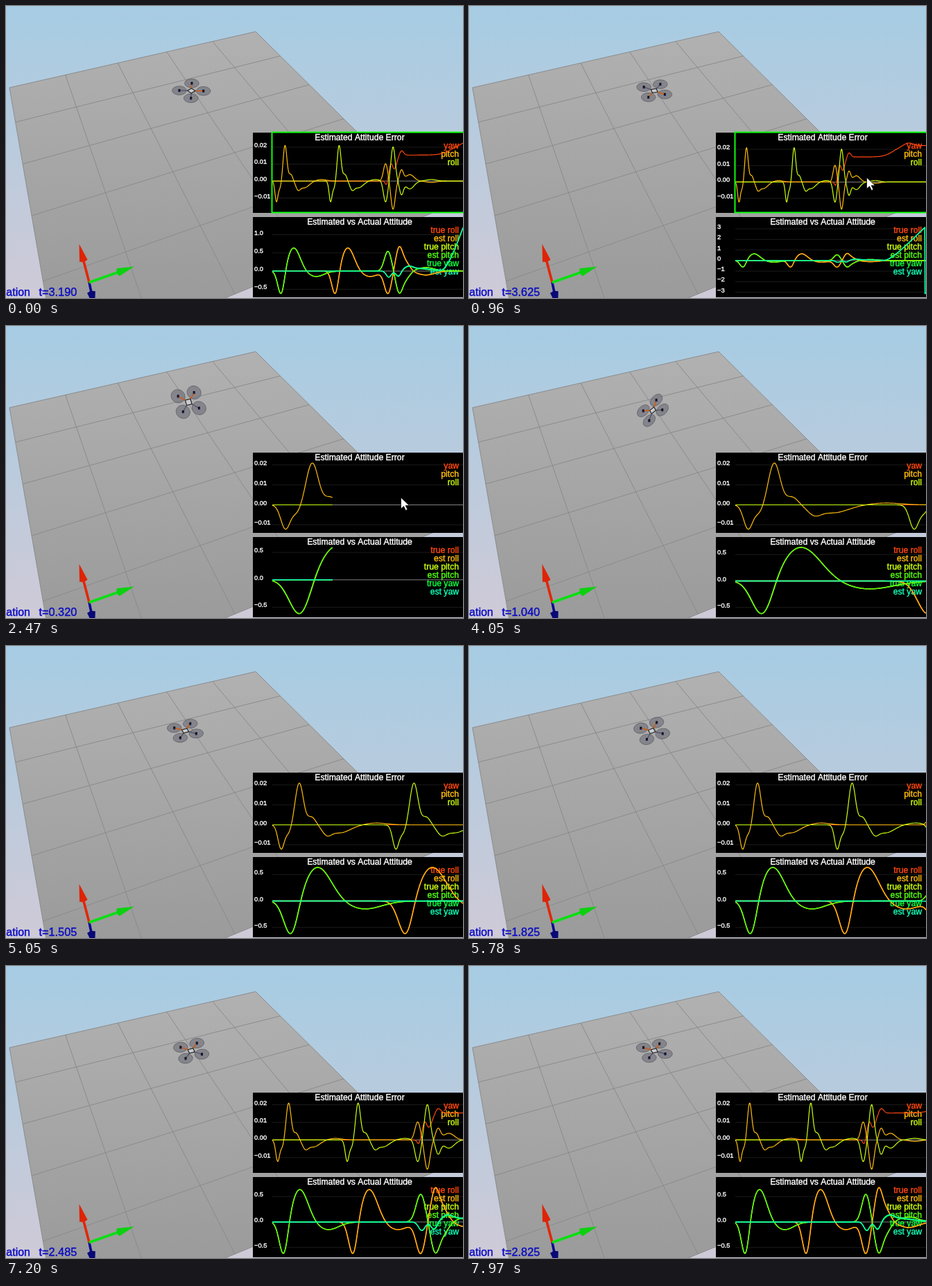
Recreate the animation shown at these times as an HTML page with a canvas. Size 659 px wide and 422 px high, loop 8000 ms.

```html
<!DOCTYPE html>
<html lang="en">
<head>
<meta charset="utf-8">
<title>Quadrotor attitude estimate</title>
<style>
html, body { margin: 0; width: 100%; height: 100%; overflow: hidden; }
canvas { display: block; width: 659px; height: 422px; }
</style>
</head>
<body>
<canvas id="stage"></canvas>
<script>
const W = 659, H = 422, LOOP = 8000, TICK = 46.6, RESET = 38, DT = 0.005;
const canvas = document.getElementById('stage');
const ctx = canvas.getContext('2d');
const ratio = window.devicePixelRatio || 1;
canvas.width = W * ratio;
canvas.height = H * ratio;

const bump = (t, center, width, height) => height * Math.exp(-(((t - center) / width) ** 2));
const rise = (t, center, width, height) => height * (1 + Math.tanh((t - center) / width)) / 2;
const smooth = (x, from, to) => {
  const s = Math.min(1, Math.max(0, (x - from) / (to - from)));
  return s * s * (3 - 2 * s);
};
const wrap = a => a > Math.PI ? a - 2 * Math.PI : a;

// Attitude: a kick on pitch, the same kick on roll, then an opposed swing of both and a yaw spin.
const ROLL_DELAY = 0.905;
const kick = t => bump(t, .15, .08, -.7) + bump(t, .36, .15, .64) + bump(t, .73, .19, -.15);
const swing = t => bump(t, 1.935, .085, .56) + bump(t, 2.12, .08, -.56)
  + bump(t, 2.23, .1, -.22) + bump(t, 2.57, .2, .1);
const spin = t => 5 * (Math.hypot(Math.max(0, t - 2.803), .2) - .2);
const pitch = t => kick(t) + .97 * swing(t);
const roll = t => kick(t - ROLL_DELAY) - 1.08 * swing(t);
const yaw = t => bump(t, 1.95, .06, -.17) + bump(t, 2.11, .06, -.16)
  + bump(t, 2.28, .1, .09) + bump(t, 2.45, .25, .06) + spin(t);

// Estimation errors caused by the same three events.
const kickError = t => bump(t, .07, .035, -.012) + bump(t, .13, .035, -.004) + bump(t, .213, .045, .021)
  + bump(t, .31, .045, .004) + bump(t, .43, .05, -.0035) + bump(t, .53, .12, -.004) + bump(t, .82, .12, .0009);
const swingError = t => bump(t, 1.895, .05, .0108) + bump(t, 2.02, .05, -.0175)
  + bump(t, 2.16, .045, .0065) + bump(t, 2.3, .1, .004) + bump(t, 2.66, .12, -.0008);
const pitchError = t => kickError(t) + .95 * swingError(t);
const rollError = t => kickError(t - ROLL_DELAY) - 1.15 * swingError(t);
const yawError = t => bump(t, 1.91, .03, -.0025) + bump(t, 1.985, .045, .009) + rise(t, 2.06, .06, .0153)
  + bump(t, 2.16, .05, .003) + rise(t, 3, .18, .007) + bump(t, 3.29, .12, .0018);

const plots = [
  { top: 183, title: 'Estimated Attitude Error', minRange: .001, width: 1.2,
    series: { yaw: yawError, pitch: pitchError, roll: rollError } },
  { top: 305, title: 'Estimated vs Actual Attitude', minRange: .02, width: 1.4,
    series: {
      'true roll': roll, 'est roll': t => roll(t) + rollError(t),
      'true pitch': pitch, 'est pitch': t => pitch(t) + pitchError(t),
      'true yaw': t => wrap(yaw(t)), 'est yaw': t => wrap(yaw(t) + yawError(t))
    } }
];
for (const plot of plots)
  plot.series = Object.entries(plot.series).map(([name, f], i) => ({
    name,
    color: `hsl(${14 + 29.5 * i}, 100%, 53%)`,
    data: Array.from({ length: 4.05 / DT }, (_, k) => f(k * DT))
  }));

function text(str, x, y, size, color, align = 'left') {
  ctx.font = `${size}px "Liberation Sans", Arial, sans-serif`;
  ctx.textAlign = align;
  ctx.lineWidth = .4;
  ctx.fillStyle = ctx.strokeStyle = color;
  ctx.fillText(str, x, y);
  ctx.strokeText(str, x, y);
}

function line(points, color, width) {
  ctx.beginPath();
  points.forEach(p => ctx.lineTo(p[0], p[1]));
  ctx.strokeStyle = color;
  ctx.lineWidth = width;
  ctx.stroke();
}

function shape(points, fill) {
  ctx.beginPath();
  points.forEach(p => ctx.lineTo(p[0], p[1]));
  ctx.closePath();
  ctx.fillStyle = fill;
  ctx.fill();
}

function gradient(from, to) {
  const g = ctx.createLinearGradient(0, 0, 0, H);
  g.addColorStop(0, from);
  g.addColorStop(1, to);
  return g;
}

// Perspective map of the unit square onto corners a, b, c, d.
function perspective(a, b, c, d) {
  const [ux, uy, vx, vy] = [b[0] - c[0], b[1] - c[1], d[0] - c[0], d[1] - c[1]];
  const sx = a[0] - b[0] + c[0] - d[0], sy = a[1] - b[1] + c[1] - d[1];
  const det = ux * vy - uy * vx;
  const g = (sx * vy - sy * vx) / det, h = (ux * sy - uy * sx) / det;
  return (u, v) => [0, 1].map(k =>
    (a[k] + (b[k] * (1 + g) - a[k]) * u + (d[k] * (1 + h) - a[k]) * v) / (1 + g * u + h * v));
}
const floorMap = perspective([5, 118], [360, 37], [487, 163], [37, 303]);
const floorAt = (col, row) => floorMap(col / 5, row / 3);

function arrow(x, y, tipX, tipY, color, head) {
  const length = Math.hypot(tipX - x, tipY - y);
  const dx = (tipX - x) / length, dy = (tipY - y) / length;
  const baseX = tipX - dx * 25, baseY = tipY - dy * 25;
  line([[x, y], [baseX + dx, baseY + dy]], color, 3.6);
  shape([[tipX, tipY], [baseX - dy * 6, baseY + dx * 6], [baseX - dx * 2, baseY - dy * 2],
    [baseX + dy * 6, baseY - dx * 6]], head);
}

function drawScene() {
  ctx.fillStyle = gradient('#a6cce3', '#cfcad7');
  ctx.fillRect(0, 0, W, H);
  shape([floorAt(0, 0), floorAt(5, 0), floorAt(5, 5), floorAt(0, 5)], gradient('#b3b3b3', '#9b9b9b'));
  for (let i = 0; i <= 5; i++) {
    line([floorAt(0, i), floorAt(5, i)], '#8b8b8b', 1);
    line([floorAt(i, 0), floorAt(i, 5)], '#8b8b8b', 1);
  }
  arrow(120, 399.5, 128, 438, '#0a0a90', '#080878');
  arrow(120, 399.5, 105.5, 344, '#e02808', '#dd2408');
  arrow(120, 399.5, 185, 376.5, '#08e010', '#0cd010');
}

function drawDrone(t) {
  const y = yaw(t), p = pitch(t), r = roll(t);
  const heading = -110.5 * Math.PI / 180 + y;
  const forward = [Math.cos(heading), -Math.sin(heading)];
  const side = [-Math.sin(heading), -Math.cos(heading)];
  // View from about 38 degrees above the floor.
  const project = (x, depth, up) => [x, -depth * .62 - up * .78];
  const f = project(forward[0] * Math.cos(p), forward[1] * Math.cos(p), Math.sin(p));
  const s = project(
    side[0] * Math.cos(r) + forward[0] * Math.sin(p) * Math.sin(r),
    side[1] * Math.cos(r) + forward[1] * Math.sin(p) * Math.sin(r),
    -Math.cos(p) * Math.sin(r));
  const cx = 267.3 + bump(t, .4, .25, -4.5) + bump(t, 1.45, .35, -9) + bump(t, 2.1, .2, -6);
  const cy = 122.5 + bump(t, .42, .35, -13.5) + bump(t, 2.1, .15, 6.5);
  const at = (a, b) => [cx + a * f[0] + b * s[0], cy + a * f[1] + b * s[1]];
  const disc = (a, b, radius) => Array.from({ length: 33 }, (_, i) =>
    at(a + radius * Math.cos(i * Math.PI / 16), b + radius * Math.sin(i * Math.PI / 16)));
  const arm = 12.3;
  const rotors = [[-arm, -arm], [-arm, arm], [arm, -arm], [arm, arm]];
  for (const [a, b] of rotors) {
    const ring = disc(a, b, 10.2);
    shape(ring, 'rgba(116,116,124,.7)');
    line(ring, '#5c5c66', .8);
  }
  for (const [a, b] of rotors) {
    line([at(a * .15, b * .15), at(a, b)], a > 0 ? '#c8601c' : '#50506c', a > 0 ? 1.8 : 1.2);
    const [x, z] = at(a, b);
    ctx.fillStyle = '#10101c';
    ctx.fillRect(x - 1.5, z - 2, 3, 4);
    ctx.fillStyle = '#28288c';
    ctx.fillRect(x - .5, z + .5, 1.5, 1.5);
  }
  const body = [at(4, -4), at(4, 4), at(-4, 4), at(-4, -4)];
  shape(body, '#c8ccd0');
  line([...body, body[0]], '#262628', 1.2);
}

function niceStep(range) {
  for (let base = 1e-5; ; base *= 10)
    for (const m of [1, 5]) if (range / (base * m) < 6.5) return base * m;
}

function drawPlot({ top, title, series, minRange, width }, t) {
  const count = Math.max(2, Math.round(t / DT) + 1);
  let min = -minRange / 2, max = minRange / 2;
  for (const { data } of series)
    for (const v of data.slice(0, count)) {
      min = Math.min(min, v);
      max = Math.max(max, v);
    }
  const high = top + 15, scale = 95.7 / (max - min);
  const toY = v => high + (max - v) * scale;
  const toX = s => 384 + s * 275 / Math.max(1.015, t);

  ctx.save();
  ctx.beginPath();
  ctx.rect(356, top, W - 356, 116);
  ctx.clip();
  ctx.fillStyle = '#000';
  ctx.fillRect(356, top, W - 356, 116);
  const step = niceStep(max - min);
  const digits = Math.max(0, Math.ceil(-Math.log10(step) - 1e-6));
  for (let k = Math.ceil(min / step); k <= max / step; k++) {
    const y = toY(k * step);
    line([[384, y], [W, y]], k ? '#1c1c1c' : '#808080', 1);
    text((k * step).toFixed(digits).replace('-', '\u2212'), 358, y, 9.3, '#fff');
  }
  text(title, 510, top + 11, 12.2, '#fff', 'center');
  series.forEach((s, i) => text(s.name, 653, top + 23 + 12 * i, 12.2, s.color, 'right'));
  ctx.lineJoin = 'round';
  for (const { data, color } of series)
    line(data.slice(0, count).map((v, i) => [toX(i * DT), toY(v)]), color, width);
  ctx.restore();
}

function drawPointer(ms) {
  const x = 573.5 - 4 * smooth(ms, 2000, 2300);
  const y = 248 + 176 * (1 - smooth(ms, 450, 880) + smooth(ms, 2600, 2950));
  const outline = [[0, 0], [0, 16], [4, 12.5], [7, 18.5], [9.5, 17.3], [6.7, 11.5], [12, 11.5], [0, 0]]
    .map(p => [x + p[0], y + p[1]]);
  shape(outline, '#fff');
  line(outline, '#111', .8);
}

function draw(ms) {
  const tick = Math.min(171, Math.floor(ms / TICK + .65));
  const clock = tick < RESET ? 3.19 + .0207 * tick : .0004 + .02122 * (tick - RESET);
  const t = Math.round(clock / DT) * DT;
  ctx.setTransform(ratio, 0, 0, ratio, 0, 0);
  drawScene();
  drawDrone(t);
  text('mation', 35, 419, 16, '#0c0cc4', 'right');
  text('t=' + t.toFixed(3), 47.5, 419, 16.3, '#0c0cc4');
  plots.forEach(plot => drawPlot(plot, t));
  if (tick < RESET) {
    ctx.strokeStyle = '#0cff0c';
    ctx.lineWidth = 2;
    ctx.strokeRect(383.5, 182.5, 280, 116);
  }
  drawPointer(ms);
}

let start;
function loop(now) {
  start ??= now;
  draw((now - start) % LOOP);
  requestAnimationFrame(loop);
}
draw(0);
requestAnimationFrame(loop);
</script>
</body>
</html>
```
